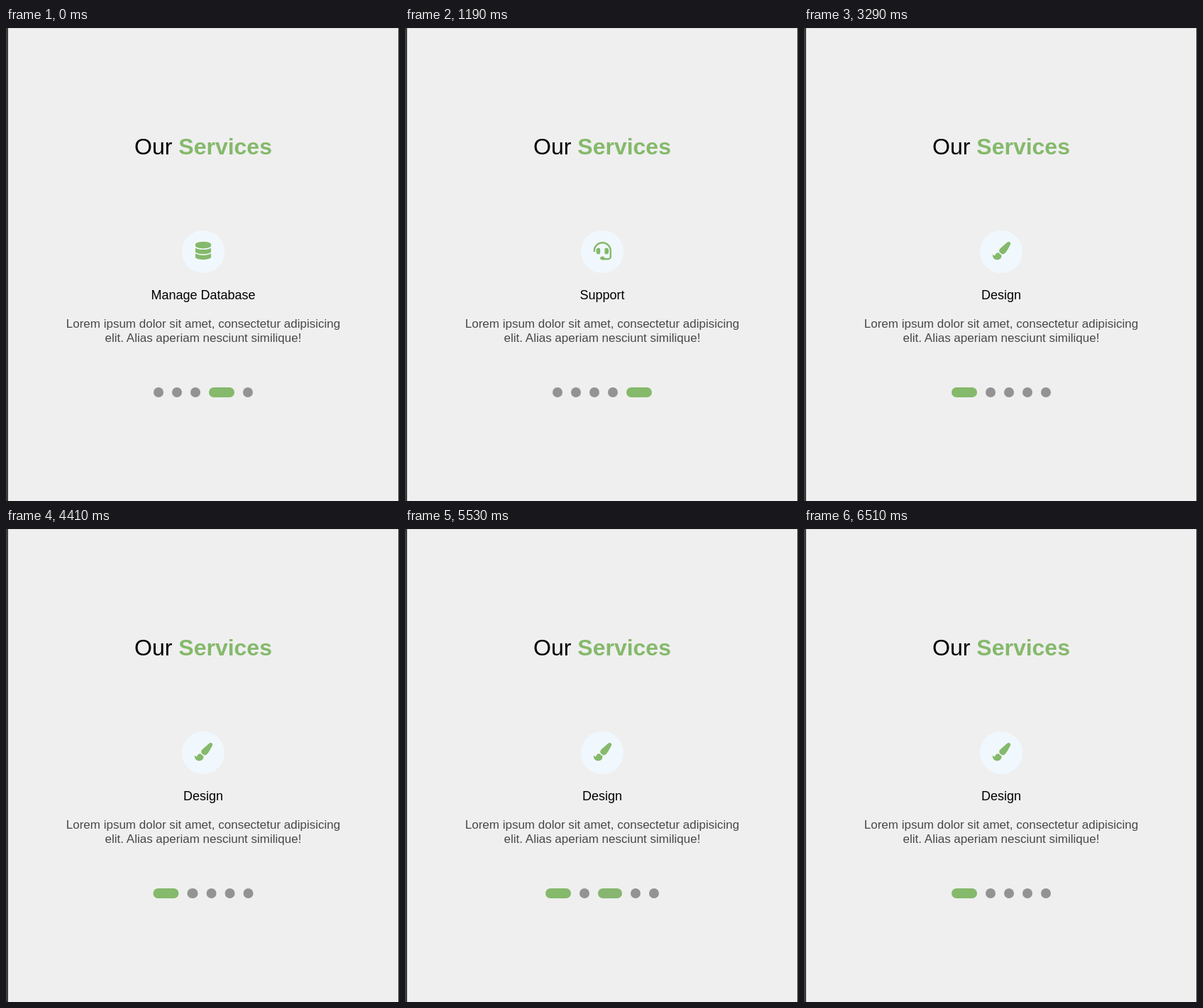
These frames come from a looping animation (554x666 px, 6860 ms). An HTML page:

```html
<!DOCTYPE html>
<html lang="en">
<head>
<meta charset="utf-8">
<title>Our Services</title>
<style>
  html, body { margin: 0; width: 100%; height: 100%; overflow: hidden; background: #efefef; }
  svg { display: block; font-family: "Liberation Sans", Arial, sans-serif; text-anchor: middle; }
  .heading { font-size: 32px; }
  .heading tspan { font-weight: bold; fill: #85b96b; }
  .name { font-size: 18px; }
  .copy { font-size: 17px; fill: #484848; }
  .icon { fill: #85b96b; }
  .line { fill: none; stroke: #85b96b; stroke-width: 48; }
</style>
</head>
<body>
<svg width="554" height="666" viewBox="0 0 554 666">
  <defs>
    <clipPath id="view"><rect x="23" y="280" width="510" height="180"/></clipPath>
    <g id="database" class="icon" transform="translate(267 301) scale(.0492)">
      <path d="M0 73C0 33 100 0 224 0s224 33 224 73v46c0 40-100 73-224 73S0 159 0 119z"/>
      <path id="disc" d="M0 176c48 33 136 49 224 49s176-16 224-49v103c0 40-100 73-224 73S0 319 0 279z"/>
      <use href="#disc" y="160"/>
    </g>
    <g id="headset" class="icon" transform="translate(265.6 301) scale(.0496)">
      <path class="line" d="M24 288V256a232 232 0 0 1 464 0V422a66 66 0 0 1-66 66H256"/>
      <path d="M160 176a32 32 0 0 1 32 32V320a32 32 0 0 1-32 32h-16a64 64 0 0 1-64-64v-48a64 64 0 0 1 64-64z"/>
      <path d="M352 176a32 32 0 0 0-32 32V320a32 32 0 0 0 32 32h16a64 64 0 0 0 64-64v-48a64 64 0 0 0-64-64z"/>
      <rect x="192" y="416" width="128" height="96" rx="48"/>
    </g>
    <g id="brush" class="icon" transform="translate(265.8 301) scale(.0496)">
      <path d="M167 309c-40 3-77 18-97 73-2 6-8 10-15 10-11 0-45-28-55-35 0 83 38 155 128 155 76 0 128-44 128-120 0-3-1-6-1-9z"/>
      <path d="M458 0c-15 0-29 7-40 16C213 199 192 203 192 257c0 14 3 27 9 39l64 53c7 2 14 3 22 3 62 0 98-45 211-256 8-15 14-30 14-46C512 21 486 0 458 0z"/>
    </g>
  </defs>
  <rect width="554" height="666" fill="#efefef"/>
  <rect width="554" height="1" fill="#dedede"/>
  <rect width="3" height="666" fill="#3d3c3e"/>
  <rect x="553" width="1" height="666" fill="#3d3c3e"/>
  <text class="heading" x="278" y="178">Our <tspan>Services</tspan></text>
  <g clip-path="url(#view)"><g id="track"></g></g>
  <g id="dots"></g>
</svg>
<script>
const LOOP = 6860, STEP = 70, PITCH = 530;
const SLIDE_MS = 258, DOT_MS = 300;
const GREY = [147, 147, 147], GREEN = [133, 185, 107];

const slides = [['database', 'Manage Database'], ['headset', 'Support'], ['brush', 'Design']];
const slideStarts = [841, 2941];

// [dot, start, grown]: autoplay first, then the pointer passing over the dots
const dotEvents = [
  [3, 859, 0], [4, 859, 1],
  [4, 2959, 0], [0, 2959, 1],
  [1, 4390, 1], [1, 5020, 0],
  [2, 5075, 1], [2, 5501, 0],
  [3, 5545, 1], [3, 5830, 0],
  [4, 5875, 1], [4, 6200, 0]
];

// cubic-bezier(.25, .1, .25, 1)
function ease(x) {
  if (x <= 0) return 0;
  if (x >= 1) return 1;
  let lo = 0, hi = 1, s = x;
  for (let i = 0; i < 24; i++) {
    s = (lo + hi) / 2;
    if (.75 * s * (1 - s) + s ** 3 < x) lo = s; else hi = s;
  }
  return .3 * s * (1 - s) ** 2 + 3 * s * s * (1 - s) + s ** 3;
}

const track = document.getElementById('track');
track.innerHTML = slides.map(([icon, name], i) => `
  <g transform="translate(${i * PITCH} 0)">
    <circle cx="278" cy="315" r="30" fill="#f1f8fd"/>
    <use href="#${icon}"/>
    <text class="name" x="278" y="382">${name}</text>
    <text class="copy" x="278" y="422">Lorem ipsum dolor sit amet, consectetur adipisicing</text>
    <text class="copy" x="278" y="442">elit. Alias aperiam nesciunt similique!</text>
  </g>`).join('');

const dotBox = document.getElementById('dots');
dotBox.innerHTML = '<rect y="506" height="14" rx="7"/>'.repeat(5);
const dots = [...dotBox.children];

function render(t) {
  const shift = slideStarts.reduce((sum, start) => sum + ease((t - start) / SLIDE_MS), 0);
  track.setAttribute('transform', `translate(${-PITCH * shift} 0)`);

  const grown = [0, 0, 0, 1, 0];
  for (const [i, start, to] of dotEvents) {
    grown[i] += (to - grown[i]) * ease((t - start) / DOT_MS);
  }
  const widths = grown.map(g => 14 + 22 * g);
  let x = 278 - (widths.reduce((a, b) => a + b) + 48) / 2;
  dots.forEach((dot, i) => {
    const rgb = GREY.map((c, k) => Math.round(c + (GREEN[k] - c) * grown[i]));
    dot.setAttribute('x', x);
    dot.setAttribute('width', widths[i]);
    dot.setAttribute('fill', `rgb(${rgb})`);
    x += widths[i] + 12;
  });
}

const t0 = performance.now();
function tick() {
  const t = (performance.now() - t0) % LOOP;
  render(Math.floor(t / STEP) * STEP);
  requestAnimationFrame(tick);
}
tick();
</script>
</body>
</html>
```
